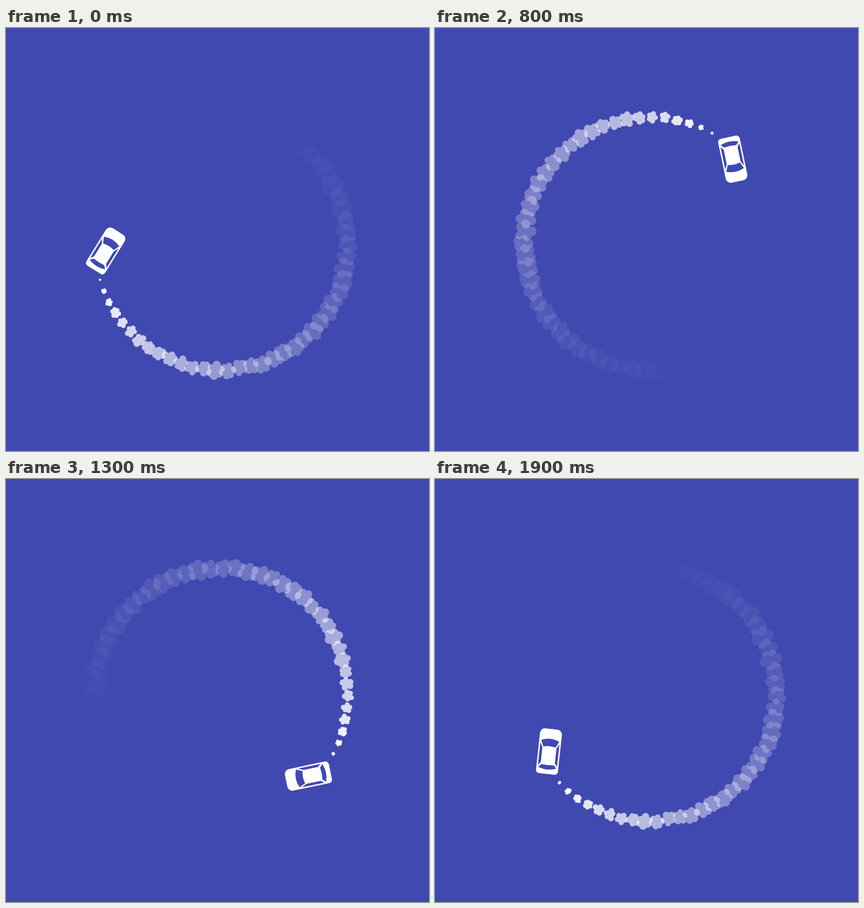
Write an HTML page with a canvas that moves like this. It is 748 px wide and 748 px high and loops after 2000 ms.

```html
<!DOCTYPE html>
<html lang="en">
<head>
<meta charset="utf-8">
<title>Drifting car</title>
<style>
  html, body { margin: 0; width: 100%; height: 100%; overflow: hidden; background: #4049b0; }
  canvas { display: block; width: 748px; height: 748px; }
</style>
</head>
<body>
<canvas id="stage" width="748" height="748"></canvas>
<script>
const ctx = document.getElementById('stage').getContext('2d');
const BG = '#4049b0';
const LOOP = 2000, STEP = 100;
const RAD = Math.PI / 180;
const PUFFS = 65, GAP = 360 / PUFFS;
const TRAIL_END = 230;

// Car's place on the circle, in degrees clockwise from the top: [step, angle]
const route = [[0, 267], [1, 281.5], [2, 281.5], [3, 315.6], [6, 367.5], [19, 601.5]];

function carAngle(step) {
  const n = route.findIndex(([s]) => s >= step);
  if (n === 0) return route[0][1];
  const [s0, a0] = route[n - 1], [s1, a1] = route[n];
  return a0 + (a1 - a0) * (step - s0) / (s1 - s0);
}

function onCircle(cx, cy, radius, deg) {
  return [cx + radius * Math.sin(deg * RAD), cy - radius * Math.cos(deg * RAD)];
}

function seeded(seed) {
  return () => {
    seed = (seed * 16807) % 2147483647;
    return seed / 2147483647;
  };
}

// A puff of unit size: a core with lobes around it
function cloud(rand) {
  const path = new Path2D();
  const blob = (x, y, r) => {
    path.moveTo(x + r, y);
    path.arc(x, y, r, 0, 7);
  };
  const lobes = rand() < 0.7 ? 5 : 6;
  const turn = rand() * 6.28;
  blob(0, 0, 0.68);
  for (let i = 0; i < lobes; i++) {
    const a = turn + (i + rand() * 0.35) * 6.283 / lobes;
    const d = 0.48 + rand() * 0.16;
    blob(d * Math.cos(a), d * Math.sin(a), 0.36 + rand() * 0.1);
  }
  return path;
}

const rand = seeded(4177);
const puffs = Array.from({ length: PUFFS }, (_, i) => ({
  angle: GAP * (i + 0.06 + 0.3 * Math.cos((GAP * i - 72) * RAD)),
  size: 0.92 + rand() * 0.18,
  shift: (rand() - 0.5) * 0.22,
  shape: cloud(rand)
}));

// Quick burst, then slow spreading
const puffRadius = age => 9 * (1 - Math.exp(-age / 14)) + 11 * (1 - Math.exp(-age / 75));
const puffAlpha = age => Math.min(1, (1 - (age - 8) / 255) ** 2.7);

function drawPuff(puff, lead) {
  const age = (((lead - puff.angle - 10.4) % 360) + 360) % 360;
  if (age > TRAIL_END) return;
  const r = puffRadius(age) * puff.size;
  const [x, y] = onCircle(380.7, 381.3, 224, puff.angle);
  const [dx, dy] = onCircle(0, 0, puff.shift * r, puff.angle);
  ctx.save();
  ctx.translate(x + dx, y + dy);
  ctx.scale(r, r);
  ctx.globalAlpha = puffAlpha(age);
  ctx.fillStyle = '#fff';
  ctx.fill(puff.shape);
  ctx.restore();
}

const body = new Path2D();
body.roundRect(-19.5, -40, 39, 80, [9, 9, 6, 6]);

const glass = new Path2D(
  'M-16 -19 Q0 -26 16 -19 L11 -8 Q0 -11 -11 -8Z' +
  'M-11 23.5 Q0 25 11 23.5 L16 29 Q0 35 -16 29Z' +
  'M-17 -15 L-12.5 -6 L-12.5 20 L-17 25.5Z' +
  'M17 -15 L12.5 -6 L12.5 20 L17 25.5Z'
);

function drawCar(angle) {
  ctx.save();
  ctx.translate(...onCircle(384, 382.8, 207.5, angle));
  ctx.rotate((angle + 124.7) * RAD);
  ctx.fillStyle = '#fff';
  ctx.fill(body);
  ctx.fillStyle = BG;
  ctx.fill(glass);
  ctx.restore();
}

function draw(now) {
  const angle = carAngle(Math.floor((now % LOOP) / STEP));
  ctx.fillStyle = BG;
  ctx.fillRect(0, 0, 748, 748);
  puffs.forEach(p => drawPuff(p, angle));
  drawCar(angle);
}

const start = performance.now();
function tick(now) {
  draw(Math.max(0, now - start));
  requestAnimationFrame(tick);
}
draw(0);
requestAnimationFrame(tick);
</script>
</body>
</html>
```
